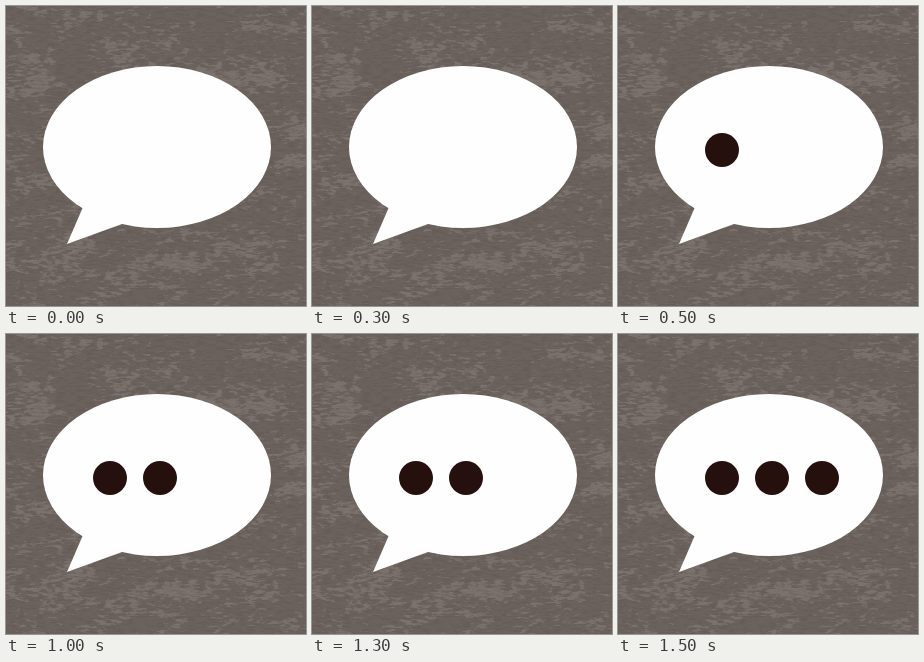
An HTML page that plays this animation: 300 px wide and 300 px high, repeating every 2000 ms.

```html
<!DOCTYPE html>
<html lang="en">
<head>
<meta charset="utf-8">
<title>Typing bubble</title>
<style>
  html, body { margin: 0; width: 100%; height: 100%; overflow: hidden; }
  svg { display: block; width: 100vw; height: 100vh; }
</style>
</head>
<body>
<svg viewBox="0 0 300 300">
  <defs>
    <!-- Coarse and fine stretched noise, biased by soft blobs and cut into ragged patches -->
    <filter id="patches" filterUnits="userSpaceOnUse" x="0" y="0" width="300" height="300" color-interpolation-filters="sRGB">
      <feGaussianBlur in="SourceAlpha" stdDeviation="14 8" result="blobs"/>
      <feTurbulence type="fractalNoise" baseFrequency=".022 .06" numOctaves="3" seed="7" result="coarse"/>
      <feTurbulence type="fractalNoise" baseFrequency=".12 .35" numOctaves="3" seed="4"/>
      <feComposite in2="coarse" operator="arithmetic" k2=".5" k3=".5"/>
      <feComposite in2="blobs" operator="arithmetic" k2="1" k3=".1"/>
      <feComponentTransfer result="mask"><feFuncA type="linear" slope="14" intercept="-7.6"/></feComponentTransfer>
      <feFlood flood-color="#7b716d"/>
      <feComposite in2="mask" operator="in"/>
    </filter>
    <filter id="grain" filterUnits="userSpaceOnUse" x="0" y="0" width="300" height="300" color-interpolation-filters="sRGB">
      <feTurbulence type="fractalNoise" baseFrequency=".1 .5" numOctaves="3" seed="3"/>
      <feColorMatrix values="0 0 0 0 .35  0 0 0 0 .31  0 0 0 0 .29  5 0 0 0 -2.3"/>
    </filter>
  </defs>
  <rect width="300" height="300" fill="#6b615d"/>
  <g filter="url(#patches)">
    <ellipse cx="25" cy="75" rx="35" ry="15"/>
    <ellipse cx="235" cy="72" rx="45" ry="15"/>
    <ellipse cx="40" cy="250" rx="40" ry="20"/>
    <ellipse cx="180" cy="258" rx="55" ry="14"/>
  </g>
  <rect width="300" height="300" filter="url(#grain)" opacity=".25"/>
  <g fill="#fffefe">
    <ellipse cx="151" cy="141" rx="114" ry="81"/>
    <path d="M77 201L61 238L116 218L110 190Z"/>
  </g>
  <g id="dots" fill="#26100e"></g>
</svg>
<script>
const dotGroup = document.getElementById('dots');
const dots = Array.from({ length: 3 }, (_, i) => {
  const dot = document.createElementNS('http://www.w3.org/2000/svg', 'circle');
  dot.setAttribute('cx', 104 + 50 * i);
  dot.setAttribute('cy', 144);
  dot.setAttribute('r', 17);
  return dotGroup.appendChild(dot);
});

function draw(now) {
  const shown = Math.floor(now % 2000 / 500);
  dots.forEach((dot, i) => dot.setAttribute('visibility', i < shown ? 'visible' : 'hidden'));
  requestAnimationFrame(draw);
}
draw(0);
</script>
</body>
</html>
```
